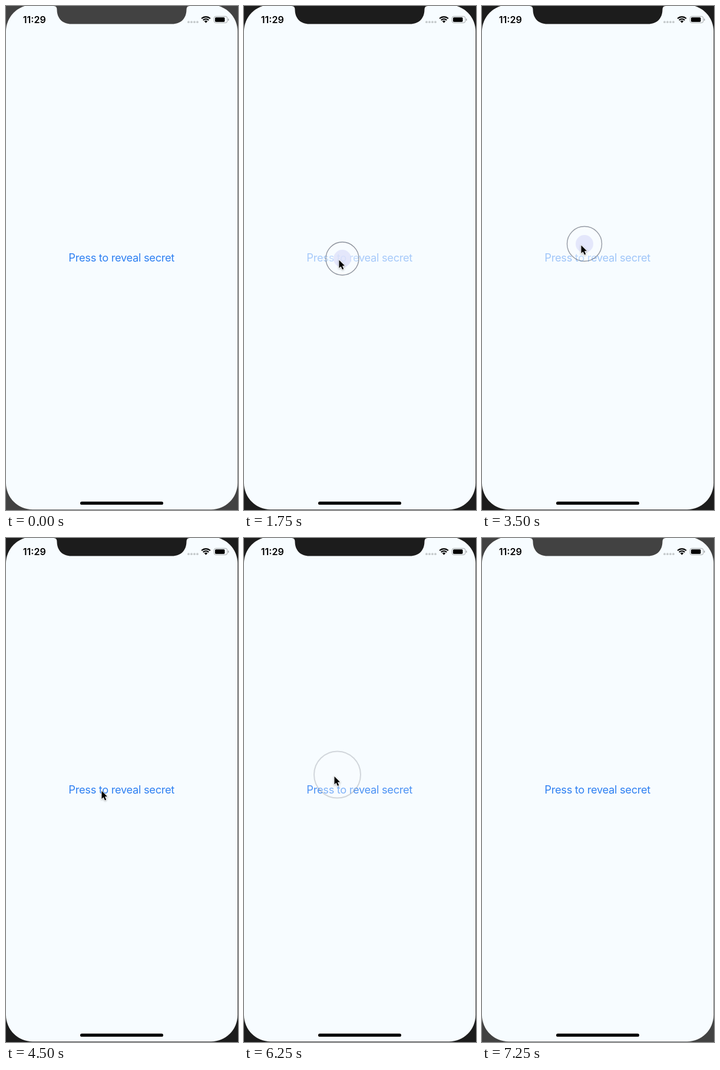
Write an HTML page with a canvas that moves like this. It is 394 by 854 pixels and loops after 7.5 s.

```html
<!DOCTYPE html>
<html lang="en">
<head>
<meta charset="utf-8">
<title>Press to reveal secret</title>
<style>
  html, body { margin: 0; width: 100%; height: 100%; overflow: hidden; background: #424242; }
  canvas { display: block; }
</style>
</head>
<body>
<canvas id="stage" width="394" height="854"></canvas>
<script>
const ctx = document.getElementById('stage').getContext('2d');
const LOOP = 7500;
const STEP = 250;
const SCREEN = '#f7fcff';

// Pointer tip: [start ms, x, y]
const pointerPath = [
  [1000, 151.5, 431], [1250, 160, 440], [1500, 161, 430], [2500, 168, 405],
  [4250, 162.5, 421], [4500, 162, 428], [5250, 153.5, 408.5], [5500, 153, 406.5],
  [5750, 153, 403.5], [6750, 75, 98], [7000, 52, -1]
];

// Tap ripples, each visible for one step
const taps = [
  { at: 1750, x: 167, y: 428, radius: 28, label: 0.4 },
  { at: 3500, x: 174, y: 403, radius: 29.5, label: 0.43 },
  { at: 4750, x: 168, y: 426, radius: 33, label: 0.55 },
  { at: 6250, x: 158.5, y: 401, radius: 39.5, label: 0.85 }
];

const between = (t, from, to) => t >= from && t < to;

function fillRound(x, y, w, h, r, color) {
  ctx.fillStyle = color;
  ctx.beginPath();
  ctx.roundRect(x, y, w, h, r);
  ctx.fill();
}

function fillCircle(x, y, r, color) {
  ctx.fillStyle = color;
  ctx.beginPath();
  ctx.arc(x, y, r, 0, Math.PI * 2);
  ctx.fill();
}

function drawText(text, x, y, font, color, align, spacing = '0px') {
  ctx.font = font;
  ctx.fillStyle = color;
  ctx.textAlign = align;
  ctx.letterSpacing = spacing;
  ctx.fillText(text, x, y);
}

function drawPhone(bezel) {
  ctx.fillStyle = bezel;
  ctx.fillRect(0, 0, 394, 854);
  fillRound(0, -2, 393.3, 855.3, 45, SCREEN);

  ctx.fillStyle = bezel;
  ctx.beginPath();
  ctx.moveTo(81, 0);
  ctx.quadraticCurveTo(86.5, 0, 86.5, 6);
  ctx.bezierCurveTo(86.5, 21, 96, 30.5, 111, 30.5);
  ctx.lineTo(282, 30.5);
  ctx.bezierCurveTo(297, 30.5, 306.5, 21, 306.5, 6);
  ctx.quadraticCurveTo(306.5, 0, 312, 0);
  ctx.fill();

  fillRound(126, 839.7, 141, 5.4, 2.7, '#000');
}

function drawWifi(x, y) {
  const arc = Math.PI / 4;
  ctx.strokeStyle = '#000';
  ctx.lineWidth = 2.2;
  for (const r of [10.4, 6.7]) {
    ctx.beginPath();
    ctx.arc(x, y, r, -Math.PI / 2 - arc, -Math.PI / 2 + arc);
    ctx.stroke();
  }
  ctx.fillStyle = '#000';
  ctx.beginPath();
  ctx.moveTo(x, y);
  ctx.arc(x, y, 4, -Math.PI / 2 - arc, -Math.PI / 2 + arc);
  ctx.fill();
}

function drawStatusBar() {
  drawText('11:29', 48.2, 29, '600 16px Inter, sans-serif', '#000', 'center');
  for (let i = 0; i < 4; i++) fillCircle(310 + i * 5, 27.2, 1.9, '#c5cacc');
  drawWifi(339.5, 28.7);
  ctx.strokeStyle = '#a3a6a8';
  ctx.lineWidth = 1;
  ctx.beginPath();
  ctx.roundRect(353.3, 17.6, 22.5, 10.9, 3);
  ctx.stroke();
  fillRound(355, 19.3, 16.5, 7.6, 1.6, '#000');
  fillRound(377, 21.3, 1.5, 3.8, 0.8, '#a3a6a8');
}

function drawRipple({ x, y, radius }) {
  const fade = Math.max(0, (radius - 28) / 12);
  fillCircle(x, y, radius, 'rgba(247, 252, 255, 0.3)');
  if (radius < 36) fillCircle(x, y, 15, 'rgba(222, 224, 250, 0.75)');
  ctx.strokeStyle = `rgba(70, 75, 90, ${0.6 - 0.4 * fade})`;
  ctx.lineWidth = 1.3 + 0.7 * fade;
  ctx.beginPath();
  ctx.arc(x, y, radius, 0, Math.PI * 2);
  ctx.stroke();
}

function drawPointer(x, y) {
  ctx.save();
  ctx.translate(x, y);
  ctx.beginPath();
  ctx.moveTo(0.5, 0.5);
  for (const [px, py] of [[0.5, 14], [3.6, 11.2], [6, 16.4], [8.2, 15.4], [5.9, 10.3], [10, 10.1]]) {
    ctx.lineTo(px, py);
  }
  ctx.closePath();
  ctx.shadowColor = 'rgba(0, 0, 0, 0.35)';
  ctx.shadowBlur = 3;
  ctx.shadowOffsetY = 1;
  ctx.strokeStyle = '#fff';
  ctx.lineWidth = 1.5;
  ctx.stroke();
  ctx.shadowColor = 'transparent';
  ctx.fillStyle = '#000';
  ctx.fill();
  ctx.restore();
}

function draw(time) {
  const t = time % LOOP;
  const focused = between(t, 1750, 7250);
  const revealed = between(t, 2000, 3500) || between(t, 4750, 6250);
  const tap = taps.find(({ at }) => between(t, at, at + STEP));
  const pointer = t < 7250 && pointerPath.findLast(([at]) => t >= at);

  drawPhone(focused ? '#1c1c1c' : '#424242');
  drawStatusBar();

  ctx.globalAlpha = tap ? tap.label : 1;
  drawText('Press to reveal secret', 196.2, revealed ? 406.6 : 433,
    '18.3px Inter, sans-serif', '#2f80f2', 'center', '-0.32px');
  ctx.globalAlpha = 1;

  if (revealed) {
    ctx.fillStyle = '#000';
    ctx.fillRect(170, 420, 52.7, 52.6);
  }
  if (tap) drawRipple(tap);
  if (pointer) drawPointer(pointer[1], pointer[2]);
}

const start = performance.now();
function tick() {
  draw(performance.now() - start);
  requestAnimationFrame(tick);
}
tick();
</script>
</body>
</html>
```
